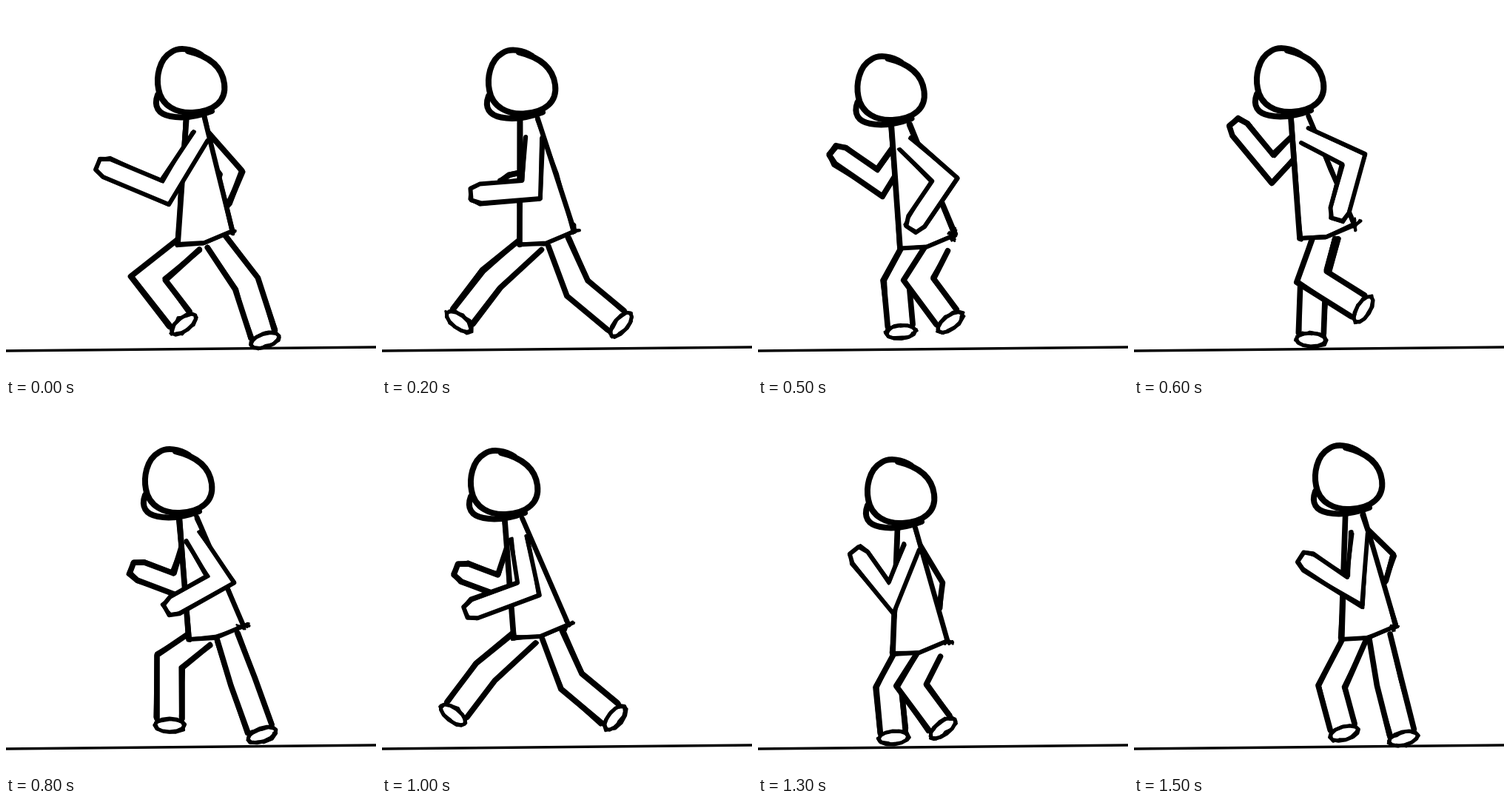
Recreate the animation shown at these times as an HTML page with a canvas. Size 500x500 px, loop 1.6 s.

```html
<!DOCTYPE html>
<html lang="en">
<head>
<meta charset="utf-8">
<style>
html, body { margin: 0; width: 100%; height: 100%; overflow: hidden; background: #fff; }
canvas { display: block; width: 500px; height: 500px; }
</style>
</head>
<body>
<canvas id="stage" width="500" height="500"></canvas>
<script>
const ctx = document.getElementById('stage').getContext('2d');

const add = (a, b, k = 1) => [a[0] + b[0] * k, a[1] + b[1] * k];
const sub = (a, b) => add(a, b, -1);
const mix = (a, b, f) => add(a, sub(b, a), f);
const unit = v => v.map(c => c / (Math.hypot(...v) || 1));
const normal = ([x, y]) => [-y, x];

// A pose holds joints only; the outline is built around them.
const pose = (head, hip, kneeA, footA, kneeB, footB, elbowNear, handNear, elbowFar, handFar) =>
  ({ head, hip, kneeA, footA, kneeB, footB, elbowNear, handNear, elbowFar, handFar });
const mapPose = (p, fn) => Object.fromEntries(Object.entries(p).map(([k, v]) => [k, fn(v, k)]));
const tween = (a, b, f) => mapPose(a, (v, k) => mix(v, b[k], f));

const push = pose([250, 102], [268, 318], [192, 368], [240, 430], [325, 375], [350, 452],
  [215, 252], [136, 219], [304, 225], [290, 262]);
const land = pose([148, 101], [196, 315], [133, 365], [119, 452], [225, 385], [312, 403],
  [208, 240], [150, 284], [142, 236], [80, 216]);
const pass = pose([211, 101], [260, 310], [242, 370], [239, 451], [240, 366], [310, 410],
  [297, 207], [278, 276], [187, 220], [143, 167]);
const lift = pose([233, 105], [283, 314], [320, 375], [346, 447], [221, 348], [221, 434],
  [290, 237], [228, 272], [235, 246], [182, 226]);
const leap = pose([165, 107], [214, 312], [256, 375], [315, 424], [140, 362], [96, 420],
  [198, 250], [125, 277], [165, 248], [112, 228]);
const sink = pose([193, 119], [218, 334], [207, 380], [250, 438], [177, 385], [183, 451],
  [180, 262], [138, 208], [236, 244], [232, 275]);
const drive = pose([290, 100], [316, 314], [267, 382], [284, 445], [345, 377], [364, 452],
  [298, 254], [236, 214], [336, 207], [328, 235]);

// The second step repeats the first with the legs exchanged.
function opposite(body, step, shift) {
  const moved = mapPose(body, v => add(v, shift));
  const leg = joint => add(step[joint], sub(moved.hip, step.hip));
  return { ...moved, kneeA: leg('kneeB'), footA: leg('footB'), kneeB: leg('kneeA'), footB: leg('footA') };
}

const keys = [
  [0, push],
  [2, opposite(tween(push, land, .5), leap, [-10, 2])],
  [4, land],
  [5, opposite(tween(land, pass, .5), sink, [0, 11])],
  [6, pass],
  [7, opposite(tween(pass, lift, .5), drive, [12, 0])],
  [8, lift],
  [10, leap],
  [12, opposite(tween(leap, sink, .6), land, [-22, -8])],
  [13, sink],
  [14, opposite(tween(sink, drive, .5), pass, [15, -8])],
  [15, drive],
  [16, push]
];

function poseAt(step) {
  const i = keys.findLastIndex(k => k[0] <= step);
  const [start, a] = keys[i], [end, b] = keys[i + 1];
  return tween(a, b, (step - start) / (end - start));
}

let seed = 0;
const random = spread => {
  const n = Math.sin(++seed * 12.9898) * 43758.5453;
  return (n - Math.floor(n) - .5) * 2 * spread;
};
const jitter = (p, spread) => add(p, [random(spread), random(spread)]);

function trace(points) {
  ctx.beginPath();
  points.forEach(p => ctx.lineTo(...p));
}

function blank(points) {
  trace(points);
  ctx.fill();
}

// One firm line with two loose ones over it.
function ink(points, width) {
  ctx.lineWidth = width * .85;
  trace(points);
  ctx.stroke();
  ctx.lineWidth = width * .5;
  for (let pass = 0; pass < 2; pass++) {
    trace(points.map(p => jitter(p, 2.5)));
    ctx.stroke();
  }
}

function limb(a, b, c, r, width, isArm) {
  const d1 = unit(sub(b, a)), d2 = unit(sub(c, b));
  const n1 = normal(d1), n2 = normal(d2);
  const bend = 1 / Math.max(.6, 1 + n1[0] * n2[0] + n1[1] * n2[1]);
  const end = isArm ? c : add(c, d2, -9);
  const side = s => [add(a, n1, s * .85), add(b, add(n1, n2), s * bend), add(end, n2, s)];
  const left = side(r), right = side(-r).reverse();
  const tip = [.6, -.6].map(s => add(add(c, d2, r), n2, s * r));
  blank([...left, ...(isArm ? tip : []), ...right]);
  if (isArm) return ink([...left, ...tip, ...right], width);
  ink(left, width);
  ink(right, width);
  const sole = Array.from({ length: 13 }, (_, i) => {
    const t = i / 6 * Math.PI;
    return add(add(c, n2, 20 * Math.cos(t)), d2, 9 * Math.sin(t));
  });
  blank(sole);
  ink(sole, 6);
}

function torso(neckFront, neckBack, hip) {
  const hemFront = add(hip, [-36, 4]), hemBack = add(hip, [38, -14]), hemLow = add(hip, [0, 2]);
  blank([neckFront, hemFront, hemLow, hemBack, neckBack]);
  ink([neckFront, mix(neckFront, hemFront, .6), hemFront], 9);
  ink([neckBack, mix(neckBack, hemBack, .5), hemBack], 8);
  ink([hemFront, hemLow, hemBack], 7);
  for (let i = 0; i < 4; i++) ink([hemBack, jitter(hemBack, 9)], 5);
}

const skull = new Path2D('M14-36C2-44-16-47-26-40C-44-30-47-5-44 10C-40 34-18 43 2 42C32 40 48 26 45 3C42-20 25-34-4-41');
const jaw = new Path2D('M-45 18C-51 34-44 44-28 47C-8 51 12 46 28 40');

function draw(step) {
  ctx.fillStyle = '#fff';
  ctx.fillRect(0, 0, 500, 500);
  ctx.strokeStyle = '#000';
  ctx.lineCap = ctx.lineJoin = 'round';
  ctx.lineWidth = 3.5;
  trace([[-5, 466], [505, 461]]);
  ctx.stroke();

  seed = step * 500;
  const p = poseAt(step);
  const neckFront = add(p.head, [(p.hip[0] - p.head[0]) * .22 - 10, 48]);
  const neckBack = add(neckFront, [24, 0]);
  const shoulder = add(neckFront, [19, 26]);
  const spread = Math.max(-16, Math.min(16, p.kneeA[0] - p.kneeB[0]));

  limb(shoulder, p.elbowFar, p.handFar, 13, 9, true);
  [[p.kneeA, p.footA, spread], [p.kneeB, p.footB, -spread]]
    .sort((a, b) => b[1][1] - a[1][1])
    .forEach(([knee, foot, dx]) => limb(add(p.hip, [dx, 0]), knee, foot, 17, 9));
  torso(neckFront, neckBack, p.hip);
  limb(shoulder, p.elbowNear, p.handNear, 13, 7, true);

  ctx.save();
  ctx.translate(...p.head);
  ctx.lineWidth = 8;
  ctx.stroke(skull);
  ctx.stroke(jaw);
  ctx.restore();
}

function loop() {
  draw(Math.floor(performance.now() % 1600 / 100));
  requestAnimationFrame(loop);
}
loop();
</script>
</body>
</html>
```
